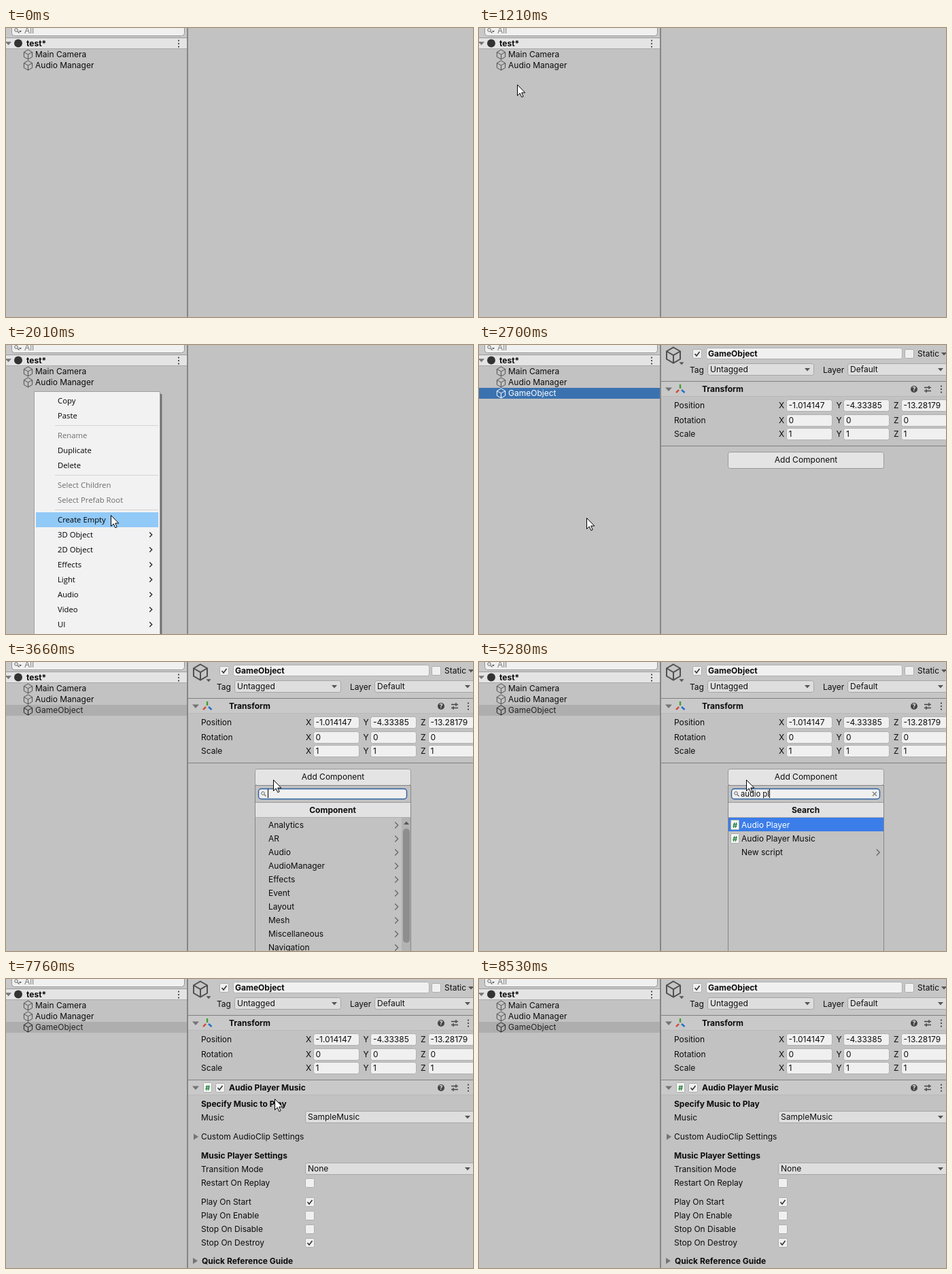
These frames come from a looping animation (687x425 px, 9.27 s). An HTML page:

```html
<!DOCTYPE html>
<html lang="en">
<head>
<meta charset="utf-8">
<title>Adding a component</title>
<style>
html, body { margin: 0; width: 100%; height: 100%; overflow: hidden; background: #c2c2c2; }
svg { display: block; width: 687px; height: 425px; font: 12px Inter, sans-serif; }
text { white-space: pre; fill: #0c0c0c; }
.b { font-weight: 700; }
.menu text { font: 11.3px "Open Sans", sans-serif; fill: #000; }
.menu .off { fill: #6d6d6d; }
</style>
</head>
<body>
<svg id="stage" viewBox="0 0 687 425"></svg>
<script>
const LOOP = 9270;
const stage = document.getElementById('stage');

// Drawing helpers, each returns SVG markup
const fill = (x, y, w, h, c, r = 0) =>
  `<rect x="${x}" y="${y}" width="${w}" height="${h}" rx="${r}" fill="${c}"/>`;
const box = (x, y, w, h, c, line, r = 3) =>
  `<rect x="${x + .5}" y="${y + .5}" width="${w - 1}" height="${h - 1}" rx="${r}" fill="${c}" stroke="${line}"/>`;
const text = (x, y, s, attrs = '') => `<text x="${x}" y="${y}" ${attrs}>${s}</text>`;
const bold = (x, y, s, attrs = '') => text(x, y, s, 'class="b" ' + attrs);
const path = (d, line, w = 1, c = 'none') =>
  `<path d="${d}" stroke="${line}" stroke-width="${w}" fill="${c}"/>`;
const down = (x, y, r = 4, c = '#555') => path(`M${x - r} ${y - r / 2}h${2 * r}l${-r} ${r + .5}z`, 'none', 0, c);
const right = (x, y) => path(`M${x - 3} ${y - 4.5}v9l7 -4.5z`, 'none', 0, '#747474');
const fold = (x, y) => down(x, y, 5, '#747474');
const chevron = (x, y, c, r = 4) => path(`M${x - r / 2} ${y - r}l${r} ${r}l${-r} ${r}`, c, 1.3);
const dots = (x, y) => [-4.5, 0, 4.5].map(d => fill(x - 1, y + d - 1, 2, 2, '#444', .6)).join('');
const lens = (x, y) =>
  `<circle cx="${x - 1}" cy="${y - 1}" r="2.3" fill="none" stroke="#666"/>` + path(`M${x + 1} ${y + 1}l2.5 2.5`, '#666', 1.2);
const cube = (x, y, r, w = 1, c = '#505050') => {
  const a = r * .87, h = r / 2;
  return path(`M${x} ${y - r}l${a} ${h}v${r}l${-a} ${h}l${-a} ${-h}v${-r}zm${-a} ${h}l${a} ${h}l${a} ${-h}M${x} ${y}v${r}`, c, w);
};
const check = (x, y, on) => box(x, y, 14, 14, '#f0f0f0', '#adadad', 2) +
  (on ? path(`M${x + 3.5} ${y + 7}l2.5 3l4.5 -6`, '#333', 1.6) : '');
const select = (x, y, w, s, arrow) => box(x, y, w, 18, '#dedede', '#a6a6a6') +
  text(x + 4, y + 13, s) + down(arrow, y + 9);
const script = (x, y) => box(x, y, 13, 15, '#f6f6f6', '#a8b0a8', 1) +
  bold(x + 6.5, y + 11.5, '#', 'text-anchor="middle" style="font-size:11px;fill:#1f7d35"');
const tools = y => `<circle cx="640" cy="${y}" r="5" fill="#444"/>` +
  bold(640, y + 3.2, '?', 'text-anchor="middle" style="font-size:9px;fill:#eee"') +
  path(`M655 ${y - 2.5}h10M655 ${y + 2.5}h10M662 ${y - 5}v5M658 ${y}v5`, '#444', 1.3) + dots(680, y);
const header = (y, title) => fill(268, y, 419, 22, '#c9c9c9') + fill(268, y - 1, 419, 1, '#808080') +
  fill(268, y + 21, 419, 1, '#b9b9b9') + fold(279, y + 11) + bold(328, y + 15, title) + tools(y + 11);

function hierarchy() {
  return fill(0, 0, 266, 14, '#c9c9c9') + box(8, -10, 255, 22, '#f0f0f0', '#959595', 4) + lens(16, 4) +
    down(21, 5, 2) + text(27, 8, 'All', 'style="fill:#7b7b7b"') +
    fill(0, 14, 266, 17, '#e4e4e4') + fill(0, 14, 266, 1, '#999') + fill(0, 30, 266, 1, '#a8a8a8') +
    down(3.5, 22.5, 4.5, '#747474') + '<circle cx="18" cy="22.5" r="6" fill="#333"/>' +
    bold(30, 27, 'test*') + dots(254, 23) +
    cube(32.5, 39, 7) + text(43, 43, 'Main Camera') + cube(32.5, 55, 7) + text(43, 59, 'Audio Manager') +
    fill(266, 0, 2, 425, '#858585');
}

const row = (back, ink) => fill(0, 63, 266, 16, back) + cube(32.5, 71, 7, 1, ink) +
  text(43, 75, 'GameObject', `style="fill:${ink}"`);

function inspector() {
  const axes = [['Position', 89, '-1.014147', '-4.33385', '-13.28179'],
    ['Rotation', 111, 0, 0, 0], ['Scale', 131, 1, 1, 1]];
  return fill(268, 0, 419, 53, '#c6c6c6') + cube(286, 15, 11.5, 2) + down(298, 27, 3.5) +
    check(314, 6, true) + box(334, 4, 289, 17, '#f0f0f0', '#b0b0b0') + bold(337, 17, 'GameObject') +
    check(626, 6) + text(645, 17, 'Static') + down(684, 13) +
    text(310, 41, 'Tag') + select(336, 27, 157, 'Untagged', 483) +
    text(506, 41, 'Layer') + select(542, 27, 160, 'Default', 679) +
    header(54, 'Transform') + path('M296 58v6', '#3fa02f', 2.4) +
    path('M294 66l-4 4', '#d2452f', 2.4) + path('M298 66l4.500 4', '#1f6fd0', 2.4) +
    axes.map(([name, y, ...v]) => text(287, y + 4, name) + v.map((n, i) => {
      const x = 441 + 84.5 * i;
      return text(x, y + 4, 'XYZ'[i]) + box(Math.floor(x + 11), y - 9, 68, 18, '#f0f0f0', '#b0b0b0') + text(x + 14.5, y + 4, n);
    }).join('')).join('') + fill(268, 148, 419, 1, '#808080');
}

function component() {
  const toggles = [['Restart On Replay', 300], ['Play On Start', 328, 1], ['Play On Enable', 348],
    ['Stop On Disable', 368], ['Stop On Destroy', 388, 1]];
  return header(149, 'Audio Player Music') + script(290, 152) + check(308, 153, true) +
    bold(287, 188, 'Specify Music to Play') + text(287, 208, 'Music') + select(440, 194, 260, 'SampleMusic', 679) +
    right(279, 232) + text(287, 236, 'Custom AudioClip Settings') +
    bold(287, 264, 'Music Player Settings') + text(287, 284, 'Transition Mode') + select(440, 270, 260, 'None', 679) +
    toggles.map(([s, y, on]) => text(287, y + 4, s) + check(440, y - 7, on)).join('') +
    right(278, 414.5) + bold(288, 419, 'Quick Reference Guide');
}

// Context menu: '-' is a separator, '~' disabled, '>' has a submenu
const entries = ['Copy', 'Paste', '-', '~Rename', 'Duplicate', 'Delete', '-', '~Select Children',
  '~Select Prefab Root', '-', 'Create Empty', '>3D Object', '>2D Object', '>Effects', '>Light', '>Audio', '>Video', '>UI'];
function menu(hover) {
  let y = 71;
  const body = entries.map(e => {
    if (e === '-') { y += 7; return fill(72, y - 4, 152, 1, '#d4d4d4'); }
    const s = e.replace(/^[~>]/, '');
    const out = (hover >= y && hover < y + 22 ? fill(44, y, 180, 22, '#91c9f7') : '') +
      text(76, y + 15, s, e[0] === '~' ? 'class="off"' : '') +
      (e[0] === '>' ? chevron(213, y + 11, '#222', 3.5) : '');
    y += 22;
    return out;
  }).join('');
  return fill(45, 72, 185, 360, 'rgba(0,0,0,.18)') + fill(45, 72, 184, 360, 'rgba(0,0,0,.3)') +
    box(41, 68, 186, 370, '#f2f2f2', '#a0a0a0', 0) + body;
}

const groups = ['Analytics', 'AR', 'Audio', 'AudioManager', 'Effects', 'Event', 'Layout', 'Mesh', 'Miscellaneous', 'Navigation'];
const parts = ['Aim Constraint', 'Animation', 'Animator', 'Area Effector 2D', 'Audio Chorus Filter',
  'Audio Distortion Filter', 'Audio Echo Filter', 'Audio High Pass Filter', 'Audio Listener',
  'Audio Low Pass Filter', 'Audio Player', 'Audio Player Music', 'Audio Reverb Filter', 'Audio Reverb Zone'];
const pen = document.createElement('canvas').getContext('2d');
pen.font = '11.2px Inter, sans-serif';

const addButton = box(366, 157, 230, 25, '#e4e4e4', '#9a9a9a') + text(481, 173, 'Add Component', 'text-anchor="middle"');
const scrollbar = fill(582, 229, 13, 196, '#b3b3b3') + path('M585 239h8l-4 -4.500z', 'none', 0, '#555') +
  fill(584, 245, 10, 168, '#8e8e8e', 5);

function popup(query, picked) {
  let list;
  if (query) {
    const found = parts.filter(p => p.toLowerCase().startsWith(query.trim()));
    list = found.map((s, i) => {
      const y = 229 + 20 * i, on = i === picked;
      return (on ? fill(367, y, 228, 20, '#3b7de9') : '') +
        (s.includes('Player') ? script(370, y + 3) : fill(371, y + 4, 12, 12, '#8a8a8a', 2)) +
        text(386, y + 15, s, on ? 'style="fill:#fff"' : '');
    }).join('');
    const y = 229 + 20 * found.length;
    list += text(386, y + 15, 'New script') + chevron(587, y + 11, '#666', 4.5);
    if (found.length > 9) list += scrollbar;
  } else {
    list = groups.map((s, i) => text(386, 244 + 20 * i, s) + chevron(574.5, 240 + 20 * i, '#666', 4.5)).join('') + scrollbar;
  }
  const caret = 385 + pen.measureText(query).width;
  return box(366, 181, 230, 260, '#c2c2c2', '#868686', 0) +
    `<rect x="371.500" y="186.500" width="218" height="15" rx="4" fill="#f0f0f0" stroke="#2c5f9e" stroke-width="1.400"/>` +
    lens(379, 194) + text(385, 198, query, 'style="font-size:11.2px"') +
    (picked ? '' : fill(caret, 187, 1, 13, '#000')) +
    (query ? path('M579 191l6 6m0 -6l-6 6', '#777', 1.2) : '') +
    fill(367, 206, 228, 23, '#e2e2e2') + fill(367, 206, 228, 1, '#9a9a9a') + fill(367, 228, 228, 1, '#b0b0b0') +
    bold(480.500, 222, query ? 'Search' : 'Component', 'text-anchor="middle"') + list;
}

// Pointer stops: time, x, y
const stops = [[300, 576, 408], [1210, 56, 83], [1420, 27, 55], [1560, 41, 68], [1650, 41, 68],
  [2010, 154, 250], [2130, 152, 256], [2640, 152, 256], [3300, 392, 173], [3660, 392, 173],
  [3660, 393, 173], [7760, 393, 173], [7760, 395, 176], [8530, 650, 430]];
function pointer(t) {
  const i = stops.findLastIndex(s => t >= s[0]);
  if (i < 0 || i === stops.length - 1) return null;
  const [t0, x0, y0] = stops[i], [t1, x1, y1] = stops[i + 1];
  const u = (t - t0) / (t1 - t0), k = u * u * (3 - 2 * u);
  return [Math.round(x0 + (x1 - x0) * k), Math.round(y0 + (y1 - y0) * k)];
}

const phrase = 'audio player';
const keys = [4040, 4260, 4410, 4490, 4570, 4880, 5160, 5280, 5380, 5570, 5680, 5780];

stage.innerHTML = hierarchy() +
  ['row', 'panel', 'menu', 'extra'].map(n => `<g id="${n}" class="${n}"></g>`).join('') +
  `<g id="arrow">${path('M.5 .5v16l3.700 -3.500l2.600 5.700l2.400 -1l-2.500 -5.600h5.100z', '#000', 1, '#fff')}</g>`;

const shown = {};
function put(id, markup) {
  if (shown[id] === markup) return;
  document.getElementById(id).innerHTML = shown[id] = markup;
}

const panelArt = inspector(), componentArt = component();
const blueRow = row('#3a72b0', '#fff'), greyRow = row('#aeaeae', '#222');

function draw(t) {
  const at = pointer(t);
  const arrow = document.getElementById('arrow');
  arrow.style.display = at ? '' : 'none';
  if (at) arrow.setAttribute('transform', `translate(${at})`);
  put('row', t < 2280 ? '' : t < 3330 ? blueRow : greyRow);
  put('panel', t < 2370 ? '' : panelArt);
  put('menu', t >= 1620 && t < 2280 ? menu(at[1]) : '');
  const typed = phrase.slice(0, keys.filter(k => t >= k).length);
  put('extra', t < 2370 ? '' : t < 3330 ? addButton :
    t < 6690 ? addButton + popup(typed, t < 6190 ? 0 : 1) : componentArt);
}

const start = performance.now();
function tick() {
  draw((performance.now() - start) % LOOP);
  requestAnimationFrame(tick);
}
tick();
</script>
</body>
</html>
```
